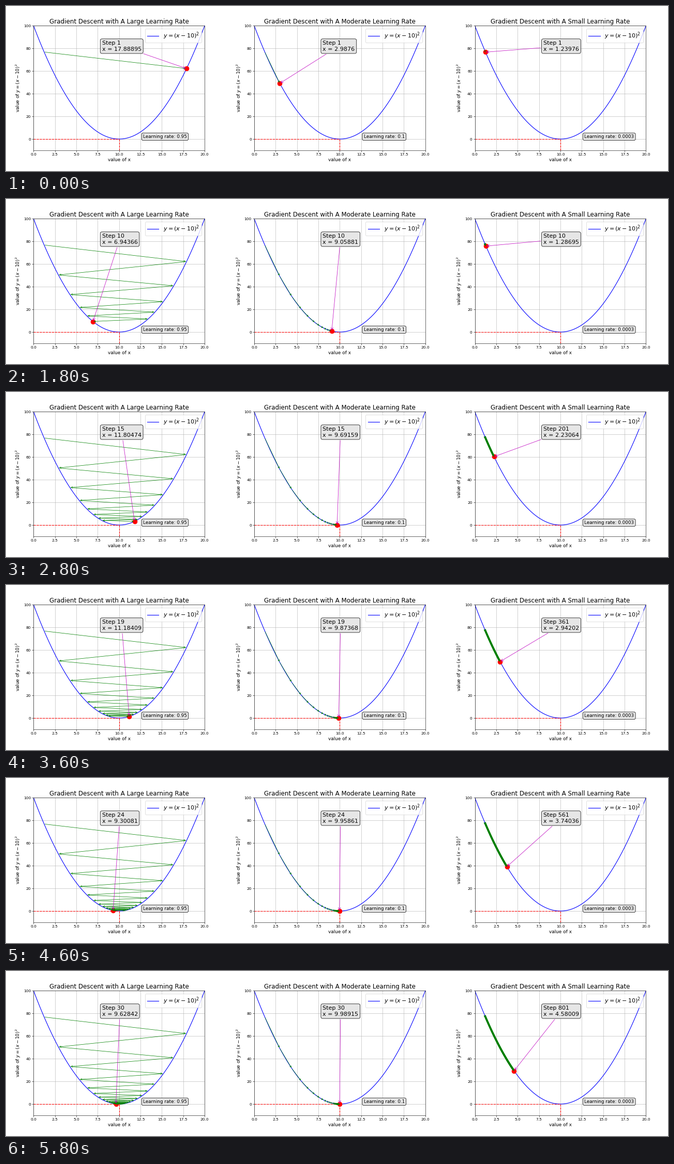
A matplotlib script for the animation above (6000 ms loop, 1280 px wide and 320 px high).

```python
import matplotlib.pyplot as plt
import numpy as np
from matplotlib.animation import FuncAnimation
from matplotlib.patches import FancyArrowPatch

FRAMES = 30
START, BEST = 1.2345, 10.0
BOX = dict(boxstyle="round", fc="0.9")


def height(x):
    return (x - BEST) ** 2


def position(rate, step):
    """Closed form of gradient descent on (x - BEST)^2."""
    return BEST + (START - BEST) * (1 - 2 * rate) ** step


def every_step(frame):
    return frame + 1


def slow_step(frame):
    """Single steps first, then jumps of forty."""
    return frame + 1 if frame < 10 else 40 * (frame - 9) + 1


class Panel:
    def __init__(self, fig, column, name, rate, step_at, marks):
        self.rate, self.step_at = rate, step_at
        ax = fig.add_axes([(1 + 8 * column) / 24, 0.125, 6.2 / 24, 0.755])

        xs = np.linspace(0, 20, 401)
        ax.plot(xs, height(xs), "b", label="$y = (x-10)^2$")
        ax.plot([0, BEST], [0, 0], "r--")
        ax.plot([BEST, BEST], [-10, 0], "r--")
        self.dot, = ax.plot([], [], "ro", markersize=12)

        self.arrows = []
        for a, b in zip(marks, marks[1:]):
            xa, xb = position(rate, a), position(rate, b)
            arrow = FancyArrowPatch((xa, height(xa)), (xb, height(xb)),
                                    arrowstyle="->", mutation_scale=10,
                                    color="g", lw=1, zorder=3)
            ax.add_patch(arrow)
            self.arrows.append((b, arrow))

        self.note = ax.annotate("", xy=(START, height(START)),
                                xytext=(0.4, 0.8), textcoords="axes fraction",
                                fontsize=15, bbox=BOX,
                                arrowprops=dict(arrowstyle="->", color="m"))
        ax.text(0.64, 0.1, f"Learning rate: {rate}", transform=ax.transAxes,
                fontsize=12, bbox=BOX, zorder=3)

        ax.set_xlim(0, 20)
        ax.set_ylim(-10, 100)
        ax.grid(True)
        ax.set_title(f"Gradient Descent with A {name} Learning Rate",
                     fontsize=16)
        ax.set_xlabel("value of x", fontsize=12)
        ax.set_ylabel("value of $y = (x-10)^2$", fontsize=12)
        ax.legend(loc="upper right", fontsize=15)

    def show(self, frame):
        step = self.step_at(frame)
        x = position(self.rate, step)
        y = height(x)
        self.dot.set_data([x], [y])
        self.note.xy = (x, y)
        self.note.set_text(f"Step {step}\nx = {round(x, 5)}")
        for last, arrow in self.arrows:
            arrow.set_visible(last <= step)


plt.rcParams["font.family"] = "DejaVu Sans"
fig = plt.figure(figsize=(24, 6), dpi=160 / 3)

steps = list(range(FRAMES + 1))
# The slow arrows overlap so closely that every second one is enough.
slow_marks = list(range(11)) + list(range(11, slow_step(FRAMES - 1) + 1, 2))
panels = [
    Panel(fig, 0, "Large", 0.95, every_step, steps),
    Panel(fig, 1, "Moderate", 0.1, every_step, steps),
    Panel(fig, 2, "Small", 0.0003, slow_step, slow_marks),
]


def update(frame):
    for panel in panels:
        panel.show(frame)
    return []


anim = FuncAnimation(fig, update, frames=FRAMES, init_func=lambda: update(0),
                     interval=200, repeat=True, repeat_delay=0, blit=False)
plt.show()
```
